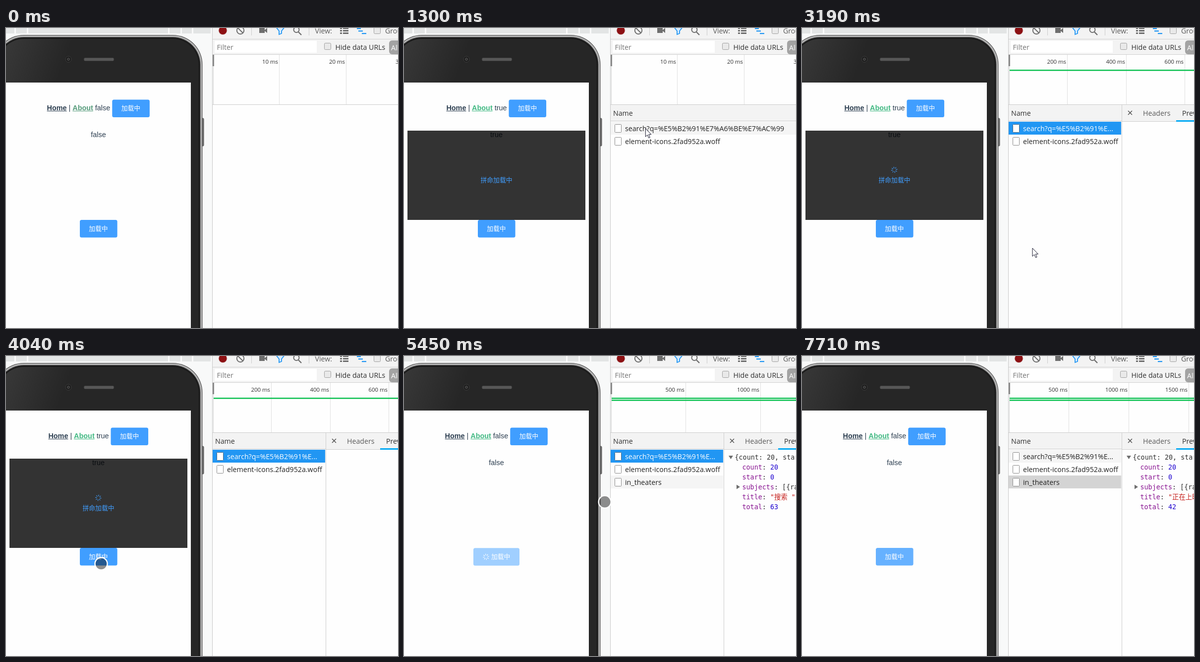
Write an HTML page with a canvas that moves like this. It is 791 px wide and 605 px high and loops after 7800 ms.

```html
<!DOCTYPE html>
<html lang="en">
<head>
<meta charset="utf-8">
<title>Loading states</title>
<style>
  html, body { margin: 0; width: 100%; height: 100%; overflow: hidden; background: #fff; }
  canvas { display: block; }
</style>
</head>
<body>
<canvas id="stage" width="791" height="605"></canvas>
<script>
const LOOP = 7800;
const ctx = document.getElementById('stage').getContext('2d');

const UI = '14.2px "Open Sans", "Noto Sans", sans-serif';
const SMALL = '11.4px "Open Sans", "Noto Sans", sans-serif';
const PAGE = '14.4px "Liberation Sans", Arial, sans-serif';
const BOLD = 'bold ' + PAGE;
const CJK = '12.8px "Noto Sans CJK SC", "Noto Sans CJK", sans-serif';
const MONO = '13.4px "DejaVu Sans Mono", "Noto Sans CJK SC", monospace';
const BLUE = '#409eff', SELECT = '#2196f3', INK = '#2c3e50', GREY = '#6e6e6e';

// Moments at which the picture switches state.
const AT = {
  firstClick: 780, overlayIn: 850, rowOpened: 1700, iconsLoaded: 2600,
  firstReply: 4120, rescale: 4200, secondClick: 4900, thirdRow: 4960,
  thirdOpened: 5850, secondReply: 6400, blur: 7710
};

// Pointer path: time, x, y.
const POINTER = [
  [70, 86, 392], [480, 250, 163], [780, 252, 164], [910, 371, 179], [980, 371, 179],
  [1200, 470, 200], [1380, 500, 204], [1700, 500, 204], [2170, 525, 347], [2550, 525, 347],
  [3000, 560, 453], [3260, 430, 440], [3340, 402, 440], [3800, 214, 425], [4040, 192, 419],
  [4430, 192, 419], [4540, 199, 412], [4670, 193, 408], [5000, 193, 408], [5610, 480, 254],
  [5850, 500, 254], [6230, 587, 429], [6370, 587, 429], [6540, 579, 435], [7080, 579, 435],
  [7250, 705, 588]
];

// Network overview scale: start time, step in ms, step in pixels, finished requests.
const SCALES = [
  [0, 10, 134.5, 0], [2600, 200, 118.5, 1], [AT.firstReply, 200, 118.5, 2],
  [AT.rescale, 500, 188, 2], [5000, 500, 151, 2], [AT.secondReply, 500, 121, 2]
];

const clamp = v => Math.max(0, Math.min(1, v));
const between = (t, a, b) => t >= a && t < b;

function rect(x, y, w, h, color) {
  ctx.fillStyle = color;
  ctx.fillRect(x, y, w, h);
}

function round(x, y, w, h, r, fill, stroke) {
  ctx.beginPath();
  ctx.roundRect(x, y, w, h, r);
  if (fill) { ctx.fillStyle = fill; ctx.fill(); }
  if (stroke) { ctx.strokeStyle = stroke; ctx.lineWidth = 1; ctx.stroke(); }
}

function circle(x, y, r, fill, stroke, width = 1) {
  ctx.beginPath();
  ctx.arc(x, y, r, 0, Math.PI * 2);
  if (fill) { ctx.fillStyle = fill; ctx.fill(); }
  if (stroke) { ctx.strokeStyle = stroke; ctx.lineWidth = width; ctx.stroke(); }
}

function path(points, { fill, stroke, width = 1, close = false }) {
  ctx.beginPath();
  points.forEach(([x, y]) => ctx.lineTo(x, y));
  if (close) ctx.closePath();
  if (fill) { ctx.fillStyle = fill; ctx.fill(); }
  if (stroke) { ctx.strokeStyle = stroke; ctx.lineWidth = width; ctx.stroke(); }
}

// Draws text and returns the x where it ends.
function text(string, x, y, color, font, align = 'left') {
  ctx.font = font;
  ctx.fillStyle = color;
  ctx.textAlign = align;
  ctx.fillText(string, x, y);
  return x + ctx.measureText(string).width;
}

function spinner(x, y, t, color) {
  ctx.save();
  ctx.translate(x, y);
  ctx.rotate(t / 2000 * Math.PI * 2);
  for (let i = 0; i < 8; i++) {
    path([[0, 3], [0, 6.3]], { stroke: color, width: 1.1 });
    ctx.rotate(Math.PI / 4);
  }
  ctx.restore();
}

function button(x, y, w, fill, textX) {
  round(x, y, w, 35.5, 3.5, fill);
  text('加载中', textX, y + 21.8, '#fff', CJK);
}

function drawPhone() {
  rect(0, 0, 416, 605, '#f8f9f9');
  rect(0, 0, 413, 11, '#e3e5e5');
  for (const x of [17, 42, 327, 352, 375]) rect(x, 0, 3, 11, '#fafafa');

  round(395, 182, 4, 56, 1.5, '#6f6f6f', '#555');
  const body = ctx.createLinearGradient(0, 50, 110, 90);
  body.addColorStop(0, '#373737');
  body.addColorStop(1, '#262626');
  const shells = [[0, '#444'], [1, '#b4b4b4'], [4, '#5c5c5c'], [5, '#1b1b1b'], [8, body]];
  for (const [inset, fill] of shells) {
    round(-24 + inset, 14 + inset, 420.5 - inset * 2, 700, 60 - inset, fill);
  }
  circle(126, 63, 6, '#1c1c1c', '#3d3d3d');
  circle(126, 63, 2.5, '#303030', '#555');
  round(157, 60, 61, 6.5, 3, '#4a4a4a');
  for (let x = 159; x < 216; x += 2) rect(x, 61, 1, 5, '#656565');
  rect(0, 110, 373, 495, '#fefefe');
}

function drawPage(t) {
  const busy = between(t, AT.firstClick, AT.firstReply);
  const word = String(busy);
  let x = busy ? 85.4 : 82.6;
  const link = (label, color) => {
    const end = text(label, x, 166, color, BOLD);
    rect(x, 167, end - x, 1, color);
    x = end;
  };
  link('Home', INK);
  x = text(' | ', x, 166, INK, PAGE);
  link('About', t < AT.firstClick ? '#579c7c' : '#42b983');
  x = text(' ' + word + ' ', x, 166, INK, PAGE);
  button(x, 144.5, 75.6, BLUE, x + 18.5);
  text(word, 186.5, 220, INK, PAGE, 'center');

  const shade = Math.min(clamp((t - AT.overlayIn) / 200), clamp((4280 - t) / 160));
  if (shade > 0) {
    ctx.save();
    ctx.globalAlpha = shade;
    rect(7, 207, 359, 180, 'rgba(0,0,0,.8)');
    text('拼命加载中', 186.5, 311, BLUE, CJK, 'center');
    if (t > AT.iconsLoaded) spinner(186.3, 286, t, BLUE);
    ctx.restore();
  }

  if (between(t, AT.secondClick, AT.secondReply)) {
    button(140, 387.2, 93, '#a0cfff', 176);
    spinner(165.5, 405, t, '#fff');
  } else {
    button(149, 387, 75.6, t < AT.secondReply ? BLUE : '#66b1ff', 167.2);
  }
}

function checkbox(x, y) {
  round(x + .5, y + .5, 13, 13, 2, '#e9e9e9', '#a0a0a0');
}

function drawToolbar() {
  rect(416, 0, 375, 605, '#fefefe');
  rect(417, 0, 374, 53, '#f3f3f3');
  rect(417, 22, 374, 1, '#d0d0d0');
  rect(417, 53, 374, 1, '#cfcfcf');

  circle(437.5, 5, 9, '#d9c2c2');
  circle(437.5, 5, 8, '#8c1013');
  circle(473, 5, 7.2, null, GREY, 2);
  path([[468, 0], [478, 10]], { stroke: GREY, width: 2 });
  rect(495, 0, 1, 15, '#ccc');
  rect(511, 0, 11, 10, GREY);
  path([[522, 4], [527, 0], [527, 10], [522, 6]], { fill: GREY });
  path([[545.5, -1], [561.5, -1], [556, 6], [556, 11], [551, 13], [551, 6]],
    { fill: '#d8ecfd', stroke: SELECT, width: 1.8, close: true });
  circle(586, 3.5, 5.5, null, GREY, 2);
  path([[590, 8], [596, 14]], { stroke: GREY, width: 2.4 });
  rect(611, 0, 1, 15, '#ccc');
  text('View:', 623.5, 11, '#5a5a5a', UI);
  for (const y of [-1, 4, 9]) {
    rect(674, y, 4, 3, GREY);
    rect(680, y, 11, 3, GREY);
  }
  [[708, 0, 8], [711, 5, 9], [718, 10, 9]].forEach(([x, y, w]) => rect(x, y, w, 2.2, SELECT));
  checkbox(742, -2);
  text('Group', 765, 11, '#5a5a5a', UI);

  rect(421, 26, 206, 24, '#fff');
  text('Filter', 425.5, 44, '#757575', UI);
  checkbox(642, 30);
  text('Hide data URLs', 664.5, 44, '#303030', UI);
  round(773, 25, 40, 28, 6, '#a3a3a3');
  text('All', 777, 45, '#fff', UI);
}

function drawOverview(t) {
  const [, unit, step, done] = SCALES.filter(s => s[0] <= t).pop();
  rect(417, 54, 3, 23, '#8c8c8c');
  rect(418, 77, 1, 77, '#d0d0d0');
  for (let i = 1; i < 5; i++) {
    const x = Math.floor(417.3 + i * step);
    rect(x, 54, 1, 100, '#e0e0e0');
    text(i * unit + ' ms', x - 2, 72, '#303030', SMALL, 'right');
  }
  for (let i = 0; i < done; i++) {
    rect(419, 84 + i * 4, 372, 2.5, '#0dc152');
  }
  rect(417, 154, 374, 1, '#ccc');
}

function drawRow(index, label, width, state) {
  const y = 189 + index * 26;
  const fill = { blue: SELECT, grey: '#d4d4d4' }[state] || (index % 2 ? null : '#f5f5f5');
  if (fill) rect(417, y, width, 26, fill);
  round(425.5, y + 5.5, 13, 16, 1, '#fff', state === 'blue' ? '#51677a' : '#8a8a8a');
  text(label, 446, y + 19, state === 'blue' ? '#fff' : '#222', UI);
}

function drawRequests(t) {
  if (t < AT.firstClick) return;
  const open = t >= AT.rowOpened;
  const width = open ? 227 : 374;
  rect(417, 155, 374, 32, '#f3f3f3');
  rect(417, 187, 374, 1, '#ccc');
  text('Name', 422, 177, '#303030', UI);

  const query = open ? '%E5%B2%91%E...' : '%E5%B2%91%E7%A6%BE%E7%AC%99';
  drawRow(0, 'search?q=' + query, width, between(t, AT.rowOpened, AT.thirdOpened) ? 'blue' : '');
  drawRow(1, 'element-icons.2fad952a.woff', width, '');
  if (t >= AT.thirdRow) {
    drawRow(2, 'in_theaters', width, t >= AT.blur ? 'grey' : t >= AT.thirdOpened ? 'blue' : '');
  }
  if (open) drawDetails(t);
}

function drawDetails(t) {
  rect(645, 155, 146, 450, '#fefefe');
  rect(645, 155, 146, 33, '#f3f3f3');
  rect(645, 188, 146, 1, '#ccc');
  rect(645, 155, 1, 450, '#ccc');
  path([[658, 167], [666, 175]], { stroke: '#555', width: 1.6 });
  path([[666, 167], [658, 175]], { stroke: '#555', width: 1.6 });
  text('Headers', 688, 177, '#5a5a5a', UI);
  text('Preview', 767, 177, '#303030', UI);
  rect(755, 186, 36, 3, '#03a9f4');

  if (t >= AT.secondReply) drawJson('正在上映', 42);
  else if (between(t, AT.firstReply, AT.thirdOpened)) drawJson('搜索 "', 63);
}

function drawJson(title, total) {
  const number = '#1c00cf', string = '#c41a16', plain = '#303030';
  path([[655, 201], [664, 201], [659.5, 208]], { fill: GREY });
  path([[671, 259.5], [678, 264], [671, 268.5]], { fill: GREY });
  text('{count: 20, start: 0', 667.5, 209, plain, MONO);
  const lines = [
    ['count', '20', number], ['start', '0', number], ['subjects', '[{rating', plain],
    ['title', '"' + title, string], ['total', String(total), number]
  ];
  lines.forEach(([key, value, color], i) => {
    const y = 229 + i * 20;
    let x = text(key, 682.5, y, '#881391', MONO);
    x = text(': ', x, y, plain, MONO);
    text(value, x, y, color, MONO);
  });
}

function drawPointer(t) {
  const next = POINTER.findIndex(p => p[0] > t);
  if (next < 1) return;
  const [t0, x0, y0] = POINTER[next - 1], [t1, x1, y1] = POINTER[next];
  const k = (t - t0) / (t1 - t0);
  const x = x0 + (x1 - x0) * k, y = y0 + (y1 - y0) * k;
  if (x < 416) {
    circle(x, y, 12.5, 'rgba(0,0,0,.44)', '#fff', 2.4);
    return;
  }
  const arrow = [[0, 0], [0, 16.5], [3.8, 13], [6.5, 19], [9, 18], [6.4, 12], [11.5, 12]];
  path(arrow.map(([dx, dy]) => [x + .5 + dx, y + .5 + dy]), { fill: '#fff', stroke: '#14142a', close: true });
}

function draw() {
  const t = performance.now() % LOOP;
  ctx.clearRect(0, 0, 791, 605);
  drawPhone();
  drawPage(t);
  drawToolbar();
  drawOverview(t);
  drawRequests(t);
  rect(416, 0, 1, 605, '#c8c8c8');
  drawPointer(t);
  requestAnimationFrame(draw);
}
draw();
</script>
</body>
</html>
```
